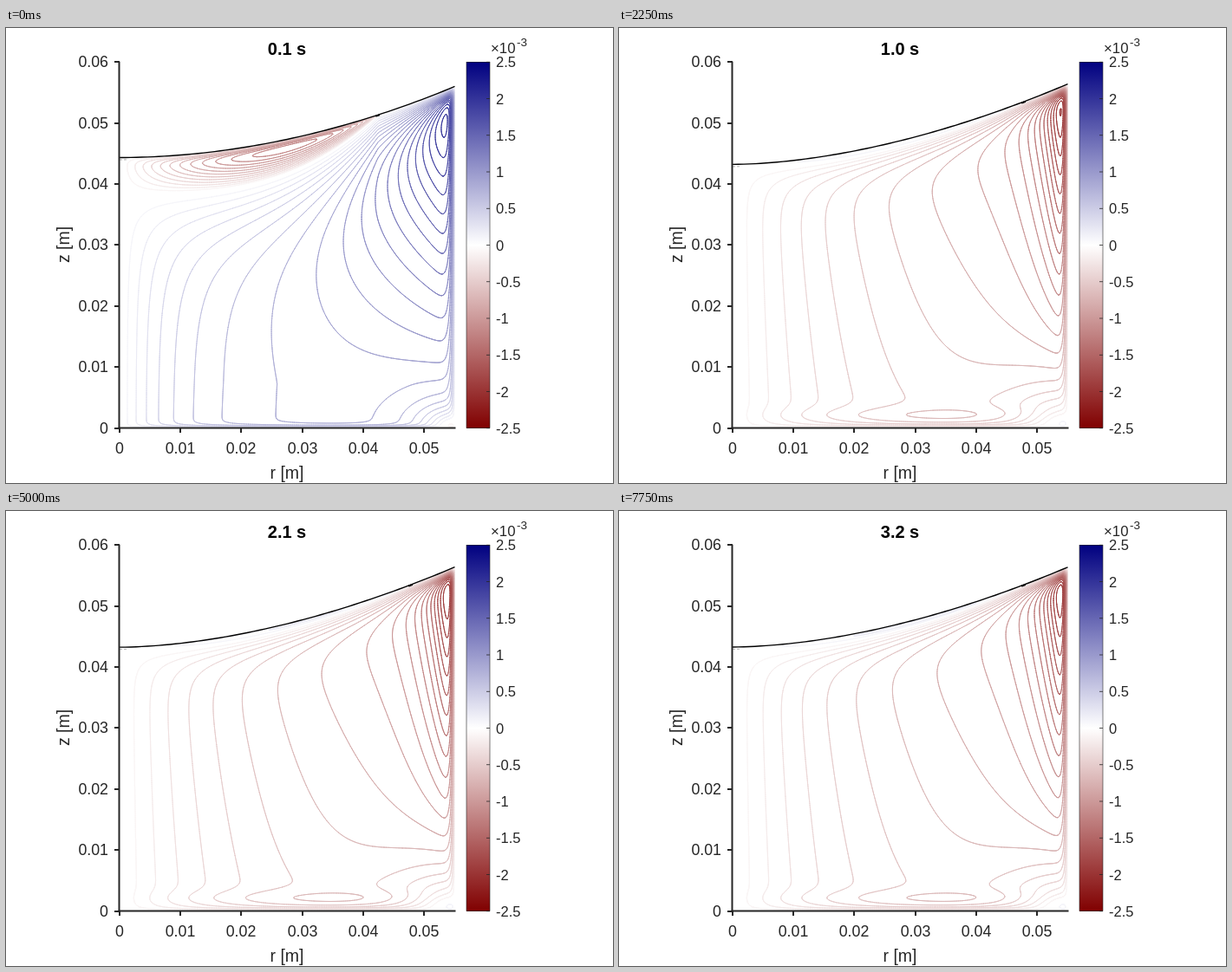
An HTML page with a canvas that plays this animation: 700x525 px, repeating every 8000 ms.

```html
<!DOCTYPE html>
<html lang="en">
<head>
<meta charset="utf-8">
<title>Streamlines</title>
<style>
  html, body { margin: 0; width: 100%; height: 100%; overflow: hidden; background: #fff; }
  canvas { display: block; }
</style>
</head>
<body>
<canvas id="stage" width="700" height="525"></canvas>
<script>
const ctx = document.getElementById('stage').getContext('2d');
const LEFT = 131, BASE = 461, WIDTH = 386.5, COLS = 220, ROWS = 200;
const INK = '#262626', STEP_MS = 250, STEPS = 32;
// In tenths of a second: one slosh, its sinking part, and the first turn.
const PERIOD = 10.85, SINK = 5, FIRST_TURN = 7.5;

// Which stroke the liquid is in, its progress 0..1, and the wake left by the stroke before.
function strokeAt(time) {
  if (time < FIRST_TURN) return { sinking: true, age: time / FIRST_TURN, wake: 0 };
  const rise = PERIOD - SINK, since = (time - FIRST_TURN) % PERIOD;
  if (since < rise) return { sinking: false, age: since / rise, wake: 0 };
  const age = (since - rise) / SINK;
  return { sinking: true, age, wake: 1 - age };
}

function sinkingFlow(age, wake) {
  return {
    top: 148 + 11 * age + 4 * wake,
    zero: 185 + 125 * age ** 1.5 + 50 * wake,
    contact: .76 + .09 * age + .04 * wake,
    bend: 3.1 - .4 * age,
    cell: -1.2 - .45 * age,
    cellSkin: .13 - .05 * age,
    core: .86 + .14 * age,
    spread: .18 + .07 * age + .04 * wake,
    tilt: 0,
    skin: .18,
    jet: 1.6 + .25 * age + .4 * wake,
    jetPow: 3,
    floor: 1.5 + 2.5 * age ** 2,
    wall: .008,
    back: 2.2 * age ** 10,
    corner: 1 - .3 * age ** 2,
    bump: -.06 * wake,
    dip: .06 * wake
  };
}

function risingFlow(age) {
  const top = 159 - 9 * age ** 2;
  return {
    top,
    zero: top + 1 + 18 * age ** 2,
    contact: .87,
    bend: 2,
    cell: age ** 2,
    cellSkin: .25,
    core: -.82,
    spread: .4,
    tilt: .45 - .35 * age,
    skin: .04,
    jet: -1.7,
    jetPow: 18 - 10 * age,
    floor: 2.5,
    wall: .006,
    back: 1.3 * age ** 2,
    corner: 1.5,
    bump: .2,
    dip: 0
  };
}

function flowAt(time) {
  const { sinking, age, wake } = strokeAt(time);
  return sinking ? sinkingFlow(age, wake) : risingFlow(age);
}

// Height of the free surface; a deeper dish has straighter flanks.
function surface(p, s) {
  const depth = p.top - 148;
  return BASE - p.top + (80 + 1.36 * depth) * s ** (2 - .025 * depth);
}

// No-slip layer; back > 1 gives a reversed sublayer.
const layer = (d, back) => 1 - Math.exp(-d) * (1 + back * d);
const bell = x => Math.exp(-x * x);

// Counter-rotating cell under the surface: t runs along it, w from its bottom to the surface.
function cellStream(p, t, w) {
  const d = p.cellSkin, peak = 1 - d * Math.log(1 + 1 / (.8 * d));
  const shape = w => w ** .8 * (1 - Math.exp((w - 1) / d));
  return p.cell * t * (1 - t) ** .55 / .365 * shape(Math.min(1, w)) / shape(peak);
}

function stream(p, s, z) {
  const h = surface(p, s), t = s / p.contact, z0 = BASE - p.zero;
  const split = t < 1 ? z0 + (surface(p, p.contact) - z0) * t ** p.bend : h;
  if (z > split && t < 1) return cellStream(p, t, (z - split) / (h - split));
  const skin = p.skin * (1 - s * s) + .016;
  const ramp = Math.max(0, (z - 50) / 345) ** 1.2;
  const core = p.core * (1 - Math.exp(-s / p.spread))
    * (1 + p.tilt * z / 300) * (1 + p.bump * bell((z - 14) / 10));
  const reach = Math.hypot(WIDTH * (1 - s) / 32, z / 20) / p.corner;
  return (core + p.jet * s ** p.jetPow * ramp)
    * (1 - Math.exp((z / split - 1) / skin))
    * layer(z / p.floor, p.back * s * s)
    * layer((1 - s) / p.wall, p.back)
    * (1 - 1.5 * Math.exp(-reach))
    * (1 - p.dip * bell((s - .962) / .012));
}

// White at 0, dark blue at 1, dark red at -1.
function shade(v) {
  const m = Math.min(1, Math.abs(v)), fade = Math.round(255 - 255 * m), main = Math.round(255 - 127 * m);
  return v > 0 ? `rgb(${fade},${fade},${main})` : `rgb(${main},${fade},${fade})`;
}

function drawContours(p) {
  const grid = [], paths = new Map();
  for (let i = 0; i <= COLS; i++) {
    const s = 1 - (1 - i / COLS) ** 1.8, h = surface(p, s);
    grid.push(Array.from({ length: ROWS + 1 }, (_, j) => {
      const z = h * (1 - Math.cos(Math.PI * j / ROWS)) / 2;
      return [LEFT + s * WIDTH, BASE - z, stream(p, s, z) * 10];
    }));
  }
  const triangle = (a, b, c) => {
    const hi = Math.max(a[2], b[2], c[2]);
    for (let n = Math.ceil(Math.min(a[2], b[2], c[2])); n <= hi; n++) {
      if (!n) continue;
      const cut = [];
      for (const [u, v] of [[a, b], [b, c], [c, a]]) {
        if (u[2] < n === v[2] < n) continue;
        const f = (n - u[2]) / (v[2] - u[2]);
        cut.push(u[0] + (v[0] - u[0]) * f, u[1] + (v[1] - u[1]) * f);
      }
      if (cut.length < 4) continue;
      if (!paths.has(n)) paths.set(n, new Path2D());
      paths.get(n).moveTo(cut[0], cut[1]);
      paths.get(n).lineTo(cut[2], cut[3]);
    }
  };
  for (let i = 0; i < COLS; i++) {
    for (let j = 0; j < ROWS; j++) {
      const a = grid[i][j], b = grid[i + 1][j], c = grid[i + 1][j + 1], d = grid[i][j + 1];
      triangle(a, b, c);
      triangle(a, c, d);
    }
  }
  ctx.lineWidth = 1;
  ctx.lineCap = 'round';
  for (const [n, path] of [...paths].sort((a, b) => Math.abs(a[0]) - Math.abs(b[0]))) {
    ctx.strokeStyle = shade(n / 25);
    ctx.stroke(path);
  }
  ctx.lineCap = 'butt';
}

function drawSurface(p) {
  const trace = (from, to, drop, width) => {
    ctx.beginPath();
    for (let k = 0; k <= 60; k++) {
      const s = from + (to - from) * k / 60;
      ctx.lineTo(LEFT + s * WIDTH, BASE - surface(p, s) + drop);
    }
    ctx.lineWidth = width;
    ctx.stroke();
  };
  ctx.strokeStyle = '#000';
  trace(0, 1, 0, 1.4);
  trace(p.contact - .008, p.contact + .004, .6, 2);
  ctx.strokeStyle = '#999';
  ctx.setLineDash([3, 2]);
  trace(0, .026, 2.5, 1);
  ctx.setLineDash([]);
}

function text(str, x, y, size, align = 'center', weight = '') {
  ctx.font = `${weight} ${size}px "Liberation Sans", Arial, sans-serif`;
  ctx.textAlign = align;
  ctx.fillText(str, x, y);
}

function drawAxes(time) {
  ctx.fillStyle = '#000';
  text((time / 10).toFixed(1) + ' s', 324, 31, 20, 'center', 'bold');
  ctx.fillStyle = INK;
  for (let i = 0; i <= 6; i++) {
    const y = Math.round(461.5 - i * 70.35), x = Math.round(130.5 + i * 70.35);
    const label = i ? '0.0' + i : '0';
    ctx.fillRect(125, y - 1, 6, 2);
    text(label, 118, y + 6, 17.8, 'right');
    if (i > 5) continue;
    ctx.fillRect(x - 1, 461, 2, 6);
    text(label, x, 491, 17.8);
  }
  ctx.fillRect(129.5, 39, 2, 423.5);
  ctx.fillRect(129.5, 460.5, 389, 2);
  text('r [m]', 324, 520, 19.5);
  ctx.save();
  ctx.translate(73, 250);
  ctx.rotate(-Math.PI / 2);
  text('z [m]', 0, 0, 19.5);
  ctx.restore();
}

function drawColorbar() {
  const bar = ctx.createLinearGradient(0, 39, 0, 462);
  [1, 0, -1].forEach((v, k) => bar.addColorStop(k / 2, shade(v)));
  ctx.fillStyle = bar;
  ctx.fillRect(531, 39, 27, 423);
  ctx.strokeStyle = INK;
  ctx.lineWidth = .6;
  ctx.strokeRect(531, 39.5, 27, 422);
  ctx.fillStyle = INK;
  for (let k = -5; k <= 5; k++) {
    const y = 250.5 - k * 42.25;
    ctx.fillRect(554, y - .4, 4, .8);
    text(String(k / 2), 565, y + 6, 16.5, 'left');
  }
  text('×10', 559, 29, 16.8, 'left');
  text('-3', 589, 21, 13.5, 'left');
}

let shown = -1;
function frame(now) {
  const step = Math.floor(now / STEP_MS) % STEPS;
  if (step !== shown) {
    shown = step;
    const flow = flowAt(step + 1);
    ctx.fillStyle = '#fff';
    ctx.fillRect(0, 0, 700, 525);
    drawContours(flow);
    drawSurface(flow);
    drawAxes(step + 1);
    drawColorbar();
  }
  requestAnimationFrame(frame);
}
frame(performance.now());
</script>
</body>
</html>
```
